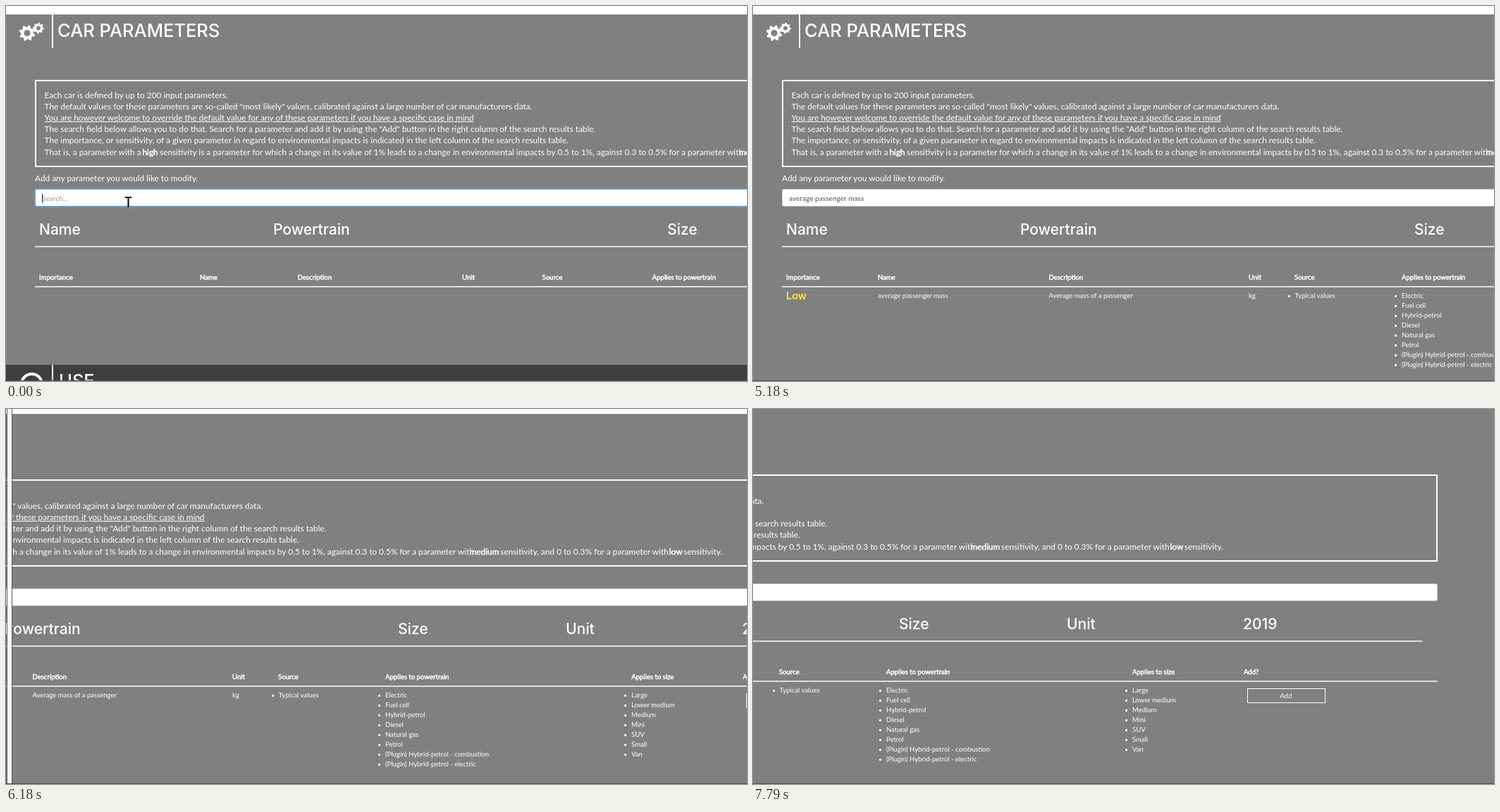
An HTML page for the animation above (8 s loop, 1051 px wide and 533 px high).

```html
<!DOCTYPE html>
<html lang="en">
<head>
<meta charset="utf-8">
<title>Car parameters</title>
<style>
  html, body { margin: 0; width: 100%; height: 100%; overflow: hidden; background: #fff; }
  #stage { position: relative; width: 1051px; height: 533px; overflow: hidden; background: #fff; }
  #stage div, #stage svg { position: absolute; box-sizing: border-box; }
  #page { left: 0; top: 0; }
  .t { white-space: pre; line-height: 20px; color: #fff; font: 11.85px/20px Lato, sans-serif; }
  .small { font-size: 9.5px; }
  .bold { -webkit-text-stroke: .5px #fff; }
  .head { font-size: 9.55px; }
  .title { font: 500 25.5px/20px Inter, sans-serif; }
  .column { font: 500 21px/20px Inter, sans-serif; }
  .low { font: 600 14.5px/20px Inter, sans-serif; color: #ffeb3b; }
  .under { text-decoration: underline; }
  .field { font-size: 10.15px; color: #555; }
  #input { left: 41px; top: 260px; width: 1661px; height: 25px; background: #fff; border: 1px solid #ccc; border-radius: 3px; }
  #input.focus { border-color: #66afe9; box-shadow: 0 0 5px rgba(102, 175, 233, .7); }
  #caret { display: inline-block; width: 1px; height: 13px; margin-right: -1px; background: #222; vertical-align: -3px; }
</style>
</head>
<body>
<div id="stage">
  <div id="page"></div>
  <div id="edge"></div>
  <div id="bottom" style="left:0;top:532px;width:1051px;height:1px;background:#4a4a4a"></div>
  <svg id="beam" width="12" height="16" style="left:168px;top:271px">
    <path d="M1 1H10M5.5 1V15" fill="none" stroke="#000" stroke-width="2"/>
  </svg>
  <svg id="arrow" width="13" height="20">
    <path d="M.5 .5V16L4.3 12.5L6.8 18.5L9.2 17.4L6.7 11.6H12Z" fill="#fff" stroke="#000"/>
  </svg>
</div>
<script>
const LOOP = 8000;
const $ = id => document.getElementById(id);
const page = $('page');

function box(x, y, w, h, css, parent = page) {
  const el = document.createElement('div');
  el.style.cssText = `left:${x}px;top:${y}px;width:${w}px;height:${h}px;${css}`;
  parent.append(el);
  return el;
}
function text(x, middle, str, cls = '', parent = page) {
  const el = document.createElement('div');
  el.className = 't ' + cls;
  el.style.left = x + 'px';
  el.style.top = middle - 10 + 'px';
  el.textContent = str;
  parent.append(el);
  return el;
}
function list(x, items, parent) {
  items.forEach((item, i) => {
    box(x - 10, 411 + 14 * i, 3, 3, 'background:#fff;border-radius:1px', parent);
    text(x, 412 + 14 * i, item, 'small', parent);
  });
}
const group = () => box(0, 0, 0, 0, '');

function gear(cx, cy, radius, hole, teeth, turn) {
  const points = [];
  for (let i = 0; i < teeth * 4; i++) {
    const r = i % 4 < 2 ? radius : radius * .74;
    const a = turn + (i + (i % 2 ? -.15 : .15)) * Math.PI / (teeth * 2);
    points.push(`${(cx + r * Math.cos(a)).toFixed(2)} ${(cy + r * Math.sin(a)).toFixed(2)}`);
  }
  const ring = `M${cx - hole} ${cy}a${hole} ${hole} 0 1 0 ${2 * hole} 0a${hole} ${hole} 0 1 0 ${-2 * hole} 0Z`;
  return `<path fill="#fff" fill-rule="evenodd" d="M${points.join('L')}Z${ring}"/>`;
}

// Section heading and description
box(0, 12, 2400, 700, 'background:#808080');
const icon = box(0, 0, 60, 60, '');
icon.innerHTML = `<svg width="60" height="60">${gear(30, 38.5, 11.5, 4.6, 8, .2)}${gear(46, 31.5, 8, 2.9, 8, 0)}</svg>`;
box(65, 12, 2, 48, 'background:#fff');
text(73, 35, 'CAR PARAMETERS', 'title');

box(41, 105, 1661, 124, 'border:2px solid #fff');
[
  'Each car is defined by up to 200 input parameters.',
  'The default values for these parameters are so-called "most likely" values, calibrated against a large number of car manufacturers data.',
  'You are however welcome to override the default value for any of these parameters if you have a specific case in mind',
  'The search field below allows you to do that. Search for a parameter and add it by using the "Add" button in the right column of the search results table.',
  'The importance, or sensitivity, of a given parameter in regard to environmental impacts is indicated in the left column of the search results table.'
].forEach((line, i) => {
  const el = text(54.5, 126.5 + 16.2 * i, line, i === 2 ? 'under' : '');
  if (i === 2) text(657, 126.5 + 16.2 * i, '.');
});
[
  [54.5, 'That is, a parameter with a'],
  [193.5, 'high', 'bold'],
  [218, 'sensitivity is a parameter for which a change in its value of 1% leads to a change in environmental impacts by 0.5 to 1%, against 0.3 to 0.5% for a parameter with'],
  [1039.5, 'medium', 'bold'],
  [1083, 'sensitivity, and 0 to 0.3% for a parameter with'],
  [1322.5, 'low', 'bold'],
  [1343, 'sensitivity.']
].forEach(([x, str, cls]) => text(x, 208, str, cls));
text(41, 245, 'Add any parameter you would like to modify.');

// Search field
const input = box(0, 0, 0, 0, '');
input.style.cssText = '';
input.id = 'input';
const placeholder = text(51, 273, 'Search...', 'field');
placeholder.style.color = '#999';
const field = text(51, 273, '', 'field');
const typed = document.createElement('span');
const caret = document.createElement('span');
caret.id = 'caret';
field.append(typed, caret);

// Selected parameters table
[[47, 'Name'], [379, 'Powertrain'], [938, 'Size'], [1176, 'Unit'], [1426, '2019']]
  .forEach(([x, str]) => text(x, 317.5, str, 'column'));
box(41, 341, 1639, 2, 'background:#ddd');

// Search results table
box(41, 398, 1661, 2, 'background:#ddd');
text(47, 386, 'Importance', 'head bold');
const headers = ['Name', 'Description', 'Unit', 'Source', 'Applies to powertrain', 'Applies to size', 'Add?'];
const addHeaders = (xs, parent) => xs.forEach((x, i) => text(x, 386, headers[i], 'head bold', parent));

const empty = group();
addHeaders([275, 413.5, 647, 760.5, 916.5], empty);
box(0, 510, 2400, 200, 'background:#3e3e3e', empty);
box(20, 521, 33, 33, 'border:4px solid #fff;border-radius:50%', empty);
box(65, 510, 2, 48, 'background:#fff', empty);
text(75, 533, 'USE', 'title', empty);

const results = group();
addHeaders([177, 419.5, 703, 768, 920, 1269, 1427], results);
text(47, 412, 'Low', 'low', results);
text(177, 412, 'average passenger mass', 'small', results);
text(419.5, 412, 'Average mass of a passenger', 'small', results);
text(703, 412, 'kg', 'small', results);
list(768.5, ['Typical values'], results);
list(920, ['Electric', 'Fuel cell', 'Hybrid-petrol', 'Diesel', 'Natural gas', 'Petrol',
  '(Plugin) Hybrid-petrol - combustion', '(Plugin) Hybrid-petrol - electric'], results);
list(1269, ['Large', 'Lower medium', 'Medium', 'Mini', 'SUV', 'Small', 'Van'], results);
const button = box(1431.5, 409, 111, 21, 'border:1px solid #fff', results);
const label = text(0, 9.5, 'Add', 'small', button);
label.style.width = '109px';
label.style.textAlign = 'center';

// Timing
const QUERY = 'average passenger mass';
const KEYS = [660, 890, 970, 1050, 1270, 1360, 1530, 1590, 1760, 1830, 2050, 2130,
  2370, 2450, 2600, 2700, 2840, 3010, 3160, 3310, 3390, 3620];
const POINTER = [[4170, 176, 272], [4250, 197, 238], [4320, 238, 184],
  [4400, 290, 112], [4480, 335, 48], [4560, 362, 7]];
const PAN = [[0, 0, 0],
  [5490, -14, 2], [5560, -38, 4], [5640, -68, 6], [5750, -112, 6], [5800, -152, 5],
  [5850, -192, 4], [5910, -232, 2], [5970, -272, 0], [6040, -312, -2], [6110, -350, -4],
  [6180, -382, -5], [6270, -374, -5], [6330, -366, -5],
  [6870, -380, -6], [6950, -408, -7], [7020, -448, -8], [7100, -492, -9], [7180, -536, -10],
  [7250, -578, -10], [7330, -615, -11], [7410, -640, -11], [7490, -662, -11], [7560, -684, -12],
  [7640, -704, -12], [7720, -720, -12], [7790, -731, -12]];

const within = (t, from, to) => t >= from && t < to;
const stepAt = (steps, t) => steps.filter(s => s[0] <= t).pop();
const show = (el, on) => { el.style.visibility = on ? 'visible' : 'hidden'; };

function draw(t) {
  const count = KEYS.filter(k => k <= t).length;
  typed.textContent = QUERY.slice(0, count);
  show(placeholder, count === 0);
  show(caret, t < 5180 && !within(t, 350, 660) && !within(t, 4170, 4630));
  input.className = t < 5180 ? 'focus' : '';
  show(empty, t < 1120);
  show(results, t >= 1120);

  const [, x, y] = stepAt(PAN, t);
  page.style.transform = `translate(${x}px,${y}px)`;

  show($('beam'), t < 4170);
  const move = stepAt(POINTER, t);
  show($('arrow'), move && t < 4630);
  if (move) {
    $('arrow').style.left = move[1] + 'px';
    $('arrow').style.top = move[2] + 'px';
  }

  // Window border trailing behind the sideways move
  const wide = within(t, 6180, 6270);
  show($('edge'), within(t, 5490, 6330));
  $('edge').style.cssText += wide
    ? ';left:1px;top:0;width:8px;height:533px;background:#fff;border:solid #555;border-width:0 1px'
    : ';left:0;top:18px;width:1px;height:515px;background:#555;border:0';
  show($('bottom'), !within(t, 6870, 7720));
}

const start = performance.now();
function tick(now) {
  draw(Math.max(0, now - start) % LOOP);
  requestAnimationFrame(tick);
}
draw(0);
requestAnimationFrame(tick);
</script>
</body>
</html>
```
